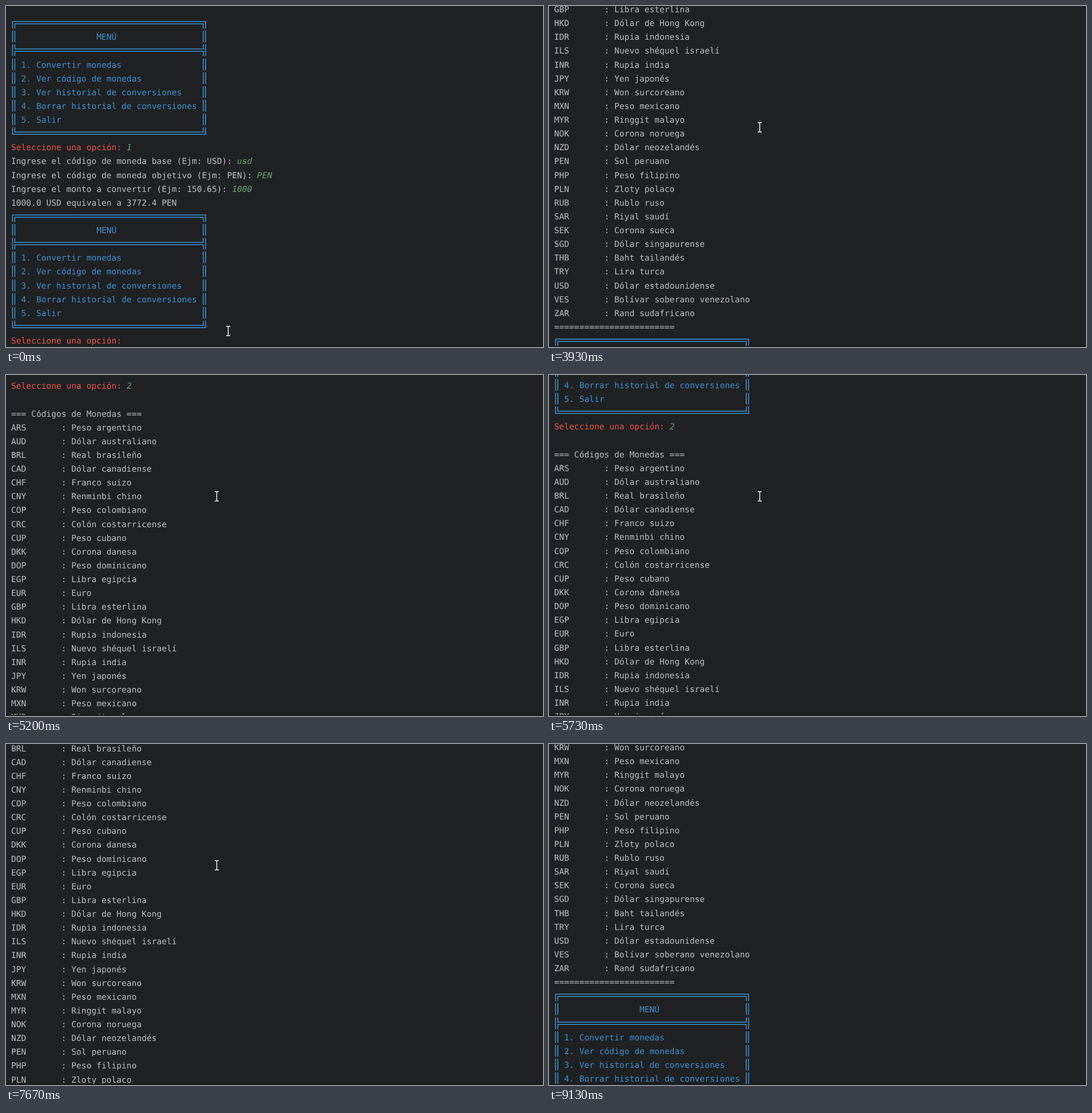
An HTML page for the animation above (9870 ms loop, 939 by 596 pixels).

```html
<!DOCTYPE html>
<html lang="es">
<head>
<meta charset="utf-8">
<title>Conversor de monedas</title>
<style>
  html, body { margin: 0; width: 100%; height: 100%; overflow: hidden; background: #1f2122; }
  svg { display: block; width: 939px; height: 596px; }
  text {
    font: 14.58px "DejaVu Sans Mono", "Noto Sans Mono", monospace;
    white-space: pre; text-rendering: geometricPrecision; fill: #bcbec4;
  }
  .red { fill: #f0524f; }
  .blue { fill: #3993d4; }
  .input { fill: #62a870; font-style: italic; }
  .frame { fill: none; stroke: #3993d4; stroke-width: 1.6; }
  .caret { fill: #ced0d6; }
  #mouse { fill: none; stroke: #f2f2f2; stroke-width: 1.5; }
</style>
</head>
<body>
<svg id="stage" viewBox="0 0 939 596">
  <g id="rows"></g>
  <rect y="594" width="939" height="2" fill="#191a1b"/>
  <path id="mouse" d="M-3.5 -8.2H-1L0 -7.2L1 -8.2H3.5M0 -7.5V7.5M-3.5 8.2H-1L0 7.2L1 8.2H3.5"/>
</svg>
<script>
const LOOP = 9870, TICK = 1000 / 15;
const LEFT = 9, COL = 8.778, LINE = 24.13, BASE = 11;
const NS = "http://www.w3.org/2000/svg";
const host = document.getElementById("rows");
const mouse = document.getElementById("mouse");
const rows = [];

function add(parent, tag, attrs, text) {
  const el = document.createElementNS(NS, tag);
  for (const name in attrs) el.setAttribute(name, attrs[name]);
  if (text) el.textContent = text;
  return parent.appendChild(el);
}

function row() {
  const g = add(host, "g", {});
  rows.push(g);
  return g;
}

// One console line: a label and, optionally, what the user typed after it.
function line(label, cls = "", typed = "") {
  const g = row();
  if (label) add(g, "text", { x: LEFT, class: cls }, label);
  if (!typed) return g;
  return add(g, "text", { x: LEFT + label.length * COL, class: "input" }, typed);
}

// Double-line box pieces, relative to the text baseline.
const X1 = 11.4, X2 = 15.4, X3 = 345, X4 = 349;
const TOP = -16, LOW = 4.6, Y1 = -7.8, Y2 = -3.8;
const sides = `M${X1} ${TOP}V${LOW}M${X4} ${TOP}V${LOW}`;
const pieces = {
  top: `M${X1} ${LOW}V${Y1}H${X4}V${LOW}M${X2} ${LOW}V${Y2}H${X3}V${LOW}`,
  mid: `${sides}M${X2} ${TOP}V${Y1}H${X3}V${TOP}M${X2} ${LOW}V${Y2}H${X3}V${LOW}`,
  end: `M${X1} ${TOP}V${Y2}H${X4}V${TOP}M${X2} ${TOP}V${Y1}H${X3}V${TOP}`,
  wall: `${sides}M${X2} ${TOP}V${LOW}M${X3} ${TOP}V${LOW}`
};

function boxLine(piece, text, col) {
  const g = row();
  add(g, "path", { class: "frame", d: pieces[piece] });
  if (text) add(g, "text", { x: LEFT + col * COL, class: "blue" }, text);
}

function menu() {
  boxLine("top");
  boxLine("wall", "MENÚ", 17);
  boxLine("mid");
  ["Convertir monedas", "Ver código de monedas", "Ver historial de conversiones",
   "Borrar historial de conversiones", "Salir"]
    .forEach((item, i) => boxLine("wall", `${i + 1}. ${item}`, 2));
  boxLine("end");
}

const ASK = "Seleccione una opción: ";
const currencies = `ARS Peso argentino|AUD Dólar australiano|BRL Real brasileño|CAD Dólar canadiense
CHF Franco suizo|CNY Renminbi chino|COP Peso colombiano|CRC Colón costarricense|CUP Peso cubano
DKK Corona danesa|DOP Peso dominicano|EGP Libra egipcia|EUR Euro|GBP Libra esterlina
HKD Dólar de Hong Kong|IDR Rupia indonesia|ILS Nuevo shéquel israelí|INR Rupia india
JPY Yen japonés|KRW Won surcoreano|MXN Peso mexicano|MYR Ringgit malayo|NOK Corona noruega
NZD Dólar neozelandés|PEN Sol peruano|PHP Peso filipino|PLN Zloty polaco|RUB Rublo ruso
SAR Riyal saudí|SEK Corona sueca|SGD Dólar singapurense|THB Baht tailandés|TRY Lira turca
USD Dólar estadounidense|VES Bolívar soberano venezolano|ZAR Rand sudafricano`.split(/[|\n]/);

line("");
menu();
line(ASK, "red", "1");
line("Ingrese el código de moneda base (Ejm: USD): ", "", "usd");
line("Ingrese el código de moneda objetivo (Ejm: PEN): ", "", "PEN");
line("Ingrese el monto a convertir (Ejm: 150.65): ", "", "1000");
line("1000.0 USD equivalen a 3772.4 PEN");
menu();
const answer = line(ASK, "red", "2");
const firstCaret = add(answer.parentNode, "rect", { class: "caret", y: -16, width: 2, height: 19 });
line("");
line("=== Códigos de Monedas ===");
currencies.forEach(c => line(c.slice(0, 3).padEnd(10) + ": " + c.slice(4)));
line("=".repeat(24));
menu();
const lastAsk = line(ASK, "red");
const lastCaret = add(lastAsk, "rect", { class: "caret", x: 210, y: -16, width: 2, height: 19 });

// Scroll moves: start tick, end tick, top line reached.
const scrolls = [
  [29, 30, 1], [33, 34, 49], [52, 59, 40], [60, 65, 34], [67, 73, 28], [73, 76, 25],
  [76, 78, 23.45], [78, 82, 19], [84, 88, 22], [92, 95, 25], [97, 101, 28],
  [114, 118, 34], [123, 137, 46]
];

// Pointer: tick, x, y.
const points = [
  [0, 388, 568], [1, 372, 562], [2, 332, 559], [3, 285, 565], [4, 248, 576], [5, 235, 580],
  [15, 234, 580], [17, 233, 581], [48, 250, 560], [49, 325, 475], [50, 405, 350],
  [51, 431, 265], [52, 400, 222], [53, 368, 212]
];

function scrollAt(k) {
  let top = 0;
  for (const [from, to, goal] of scrolls) {
    if (k <= from) break;
    const u = Math.min(1, (k - from) / (to - from));
    top += (goal - top) * u * u * (3 - 2 * u);
  }
  return top;
}

function show(el, on) {
  el.style.visibility = on ? "visible" : "hidden";
}

function draw(t) {
  const k = Math.floor((t + 3.4) / TICK);
  const top = scrollAt(k);
  rows.forEach((g, i) => {
    const y = Math.round(BASE + (i - top) * LINE);
    const seen = y > -20 && y < 620;
    g.style.display = seen ? "" : "none";
    if (seen) g.setAttribute("transform", `translate(0 ${y})`);
  });

  const typed = k >= 20;
  show(answer, typed);
  firstCaret.setAttribute("x", typed ? 219 : 210);
  show(firstCaret, (k >= 9 && k < 17) || (typed && k < 30));
  show(lastCaret, k >= 35);

  const [, x, y] = points.filter(p => p[0] <= k).pop();
  mouse.setAttribute("transform", `translate(${x + 0.5} ${y})`);
  show(mouse, k < 137);
}

const start = performance.now();
function tick() {
  draw((performance.now() - start) % LOOP);
  requestAnimationFrame(tick);
}
tick();
</script>
</body>
</html>
```
